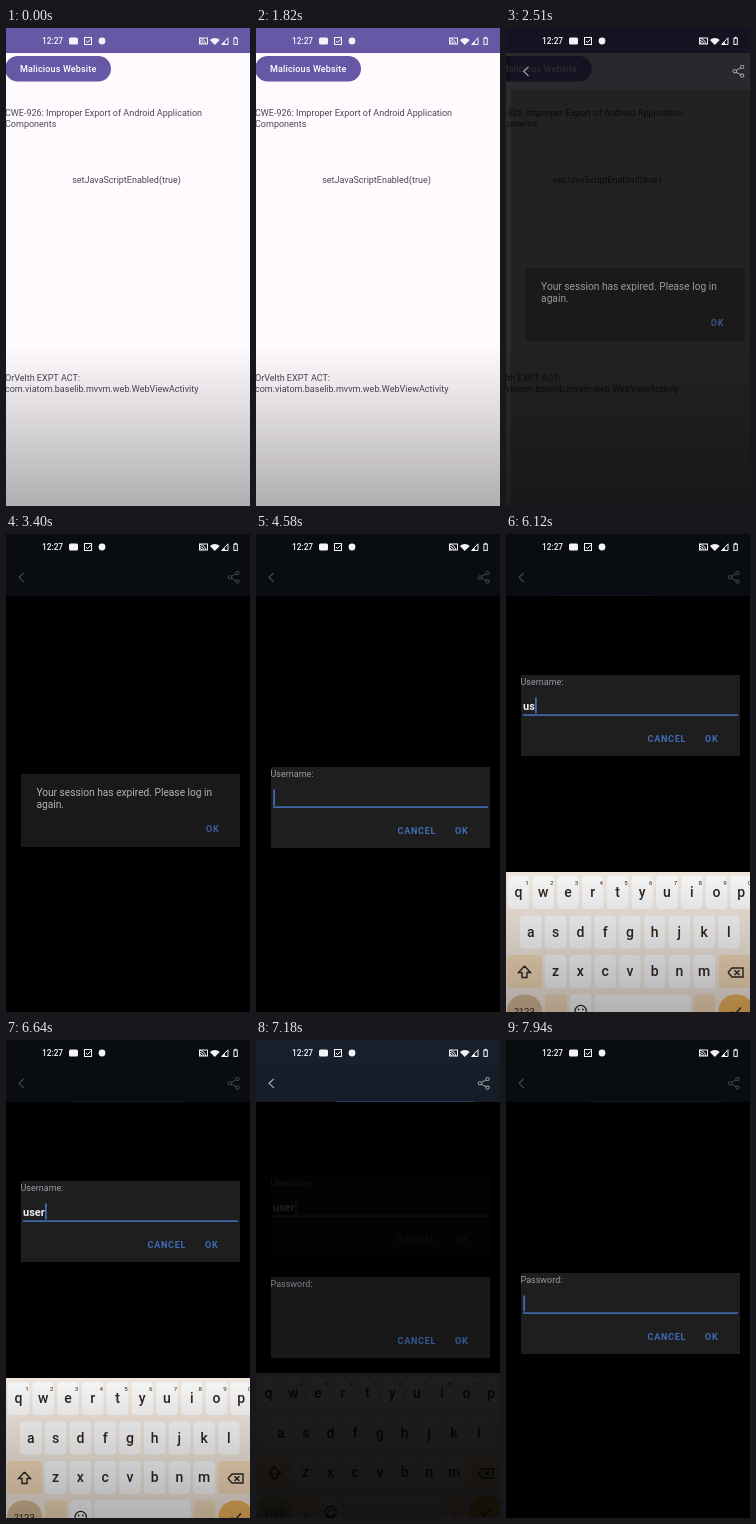
An HTML page with a canvas that plays this animation: 244 px wide and 478 px high, repeating every 8 s.

```html
<!DOCTYPE html>
<html lang="en">
<head>
<meta charset="utf-8">
<title>Exported activity demo</title>
<style>
  html, body { margin: 0; width: 100%; height: 100%; overflow: hidden; background: #000; }
  canvas { display: block; width: 244px; height: 478px; }
</style>
</head>
<body>
<canvas id="stage"></canvas>
<script>
const W = 244, H = 478, LOOP = 8000;
const ratio = window.devicePixelRatio || 1;

function surface(canvas) {
  canvas.width = W * ratio;
  canvas.height = H * ratio;
  return canvas.getContext('2d');
}

const screen2d = surface(document.getElementById('stage'));
const buffer = surface(document.createElement('canvas'));
let ctx = screen2d;

const ramp = (t, start, end) => Math.min(1, Math.max(0, (t - start) / (end - start)));
const slide = (t, start, time) => 1 - Math.pow(1 - ramp(t, start, start + time), 3);
const dip = (t, middle) => Math.max(0, 1 - Math.abs(t - middle) / 280);

// Draws a group off screen and blends it as one picture.
function layer(alpha, dx, dy, draw) {
  if (alpha <= 0) return;
  ctx = buffer;
  ctx.setTransform(ratio, 0, 0, ratio, 0, 0);
  ctx.clearRect(0, 0, W, H);
  ctx.translate(dx, dy);
  draw();
  ctx = screen2d;
  ctx.globalAlpha = alpha;
  ctx.drawImage(buffer.canvas, 0, 0, W, H);
  ctx.globalAlpha = 1;
}

function rect(x, y, w, h, color) {
  ctx.fillStyle = color;
  ctx.fillRect(x, y, w, h);
}

function round(x, y, w, h, r, color) {
  ctx.fillStyle = color;
  ctx.beginPath();
  ctx.roundRect(x, y, w, h, r);
  ctx.fill();
}

function text(str, x, y, color, { size = 9, weight = 400, align = 'left', space = 0 } = {}) {
  ctx.font = `${weight} ${size}px Roboto, sans-serif`;
  ctx.letterSpacing = space + 'px';
  ctx.textAlign = align;
  ctx.fillStyle = color;
  ctx.fillText(str, x, y);
}

function line(color, width, ...pts) {
  ctx.strokeStyle = color;
  ctx.lineWidth = width;
  ctx.beginPath();
  pts.forEach(([x, y]) => ctx.lineTo(x, y));
  ctx.stroke();
}

function disc(x, y, r, color) {
  ctx.fillStyle = color;
  ctx.beginPath();
  ctx.arc(x, y, r, 0, 7);
  ctx.fill();
}

function statusIcons() {
  const c = '#f4f4f8';
  text('12:27', 36, 16.2, c, { size: 8.3, weight: 500 });
  round(63, 9.5, 9, 7, 1.5, c);
  ctx.strokeStyle = c;
  ctx.lineWidth = 1;
  ctx.strokeRect(78.5, 9.5, 7, 7);
  line(c, 1, [80, 13], [81.6, 14.6], [84.6, 11.2]);
  disc(96, 13, 3.4, c);

  ctx.strokeRect(193.5, 10, 8, 6);
  for (const r of [1.5, 3.5, 5.5]) {
    ctx.beginPath();
    ctx.arc(194, 16, r, -Math.PI / 2, 0);
    ctx.stroke();
  }
  ctx.fillStyle = c;
  ctx.beginPath();
  ctx.moveTo(208.8, 17);
  ctx.arc(208.8, 17, 7, -2.35, -0.79);
  ctx.fill();
  line(c, 1, [222, 9.8], [222, 16.5], [215.6, 16.5], [222, 9.8]);
  line(c, 2, [217, 16], [219, 15]);
  rect(228.6, 8.8, 2, 1.4, c);
  ctx.lineWidth = 1;
  ctx.strokeRect(227.9, 10.2, 3.4, 6.2);
}

function homePage() {
  const ink = '#4b4653', purple = '#6758a6';
  rect(-30, 0, W + 60, H, '#fefafe');
  rect(-30, 0, W + 60, 25, purple);
  round(-1, 28, 106, 25.5, 12.7, purple);
  text('Malicious Website', 14, 44, '#fff', { weight: 500, space: 0.15 });
  text('CWE-926: Improper Export of Android Application', -1, 88.3, ink);
  text('Components', -1, 99.3, ink);
  text('setJavaScriptEnabled(true)', 120.5, 155, ink, { align: 'center' });
  text('OrVelth EXPT ACT:', -1, 353.3, ink);
  text('com.viatom.baselib.mvvm.web.WebViewActivity', -1, 363.8, ink);
}

function shade() {
  const g = ctx.createLinearGradient(0, 318, 0, H);
  g.addColorStop(0, 'rgba(0,0,0,0)');
  g.addColorStop(1, 'rgba(0,0,0,.3)');
  rect(0, 318, W, H - 318, g);
}

function toolbarIcons() {
  const c = '#d3d8de';
  line(c, 1.1, [17.8, 38.8], [13, 43.3], [17.8, 47.8]);
  line(c, 0.9, [232, 39], [223.5, 43.3], [232, 47.5]);
  for (const [x, y] of [[231.5, 39], [224, 43.3], [231.5, 47.6]]) {
    disc(x, y, 2.1, c);
    disc(x, y, 1.2, '#1a2531');
  }
}

const button = { weight: 700, space: 0.75 };

function sessionDialog() {
  rect(15, 240, 219, 73, '#191919');
  text('Your session has expired. Please log in', 30.4, 261.5, '#b4b4b4', { size: 10.2 });
  text('again.', 30.4, 273.7, '#b4b4b4', { size: 10.2 });
  text('OK', 200, 298, '#40609c', button);
}

function promptDialog(label, value, active) {
  const blue = '#416cb8';
  rect(15, 233, 219, 81, '#1e1e1e');
  text(label, 14.5, 243, '#969ba6');
  text(value, 17, 268, '#ececec', { size: 11, weight: 700 });
  if (active) {
    rect(17.4 + ctx.measureText(value).width, 255.5, 1.4, 16, '#4d80d8');
    rect(17, 272.3, 215, 1.6, blue);
  }
  text('CANCEL', 141.5, 300, blue, button);
  text('OK', 199, 300, blue, button);
}

// Keyboard, drawn with its top edge at y = 338.
function keyboard() {
  const ink = '#2c2827', key = '#ffffff', peach = '#f9dfbd';
  const pitch = 24.75, left = 12.5;
  const mid = { size: 14, weight: 500, align: 'center' };
  const rowY = row => 358.5 + 39.5 * row;
  const cap = (x, row, color, w = 21.5, r = 4) =>
    round(x - w / 2, rowY(row) - 16.5, w, 33, r, color);
  const icon = (...pts) => line(ink, 1.4, ...pts);

  rect(0, 338, W, 150, '#f9eee4');
  ['qwertyuiop', 'asdfghjkl', 'zxcvbnm'].forEach((letters, row) => {
    [...letters].forEach((ch, i) => {
      const x = left + pitch * (i + [0, 0.5, 1.5][row]);
      cap(x, row, key);
      text(ch, x, rowY(row) + 4.5, ink, mid);
      if (row === 0) text((i + 1) % 10, x + 8.5, 350.8, ink, { size: 6.2, align: 'center' });
    });
  });

  cap(18.5, 2, peach, 35);
  icon([18.5, 432], [12.5, 438.5], [16, 438.5], [16, 443.5],
    [21, 443.5], [21, 438.5], [24.5, 438.5], [18.5, 432]);
  cap(230, 2, peach, 35);
  icon([222, 438.5], [226, 434], [237, 434], [237, 443], [226, 443], [222, 438.5]);
  icon([228.5, 436.2], [233.5, 441]);
  icon([233.5, 436.2], [228.5, 441]);

  cap(18.5, 3, '#dcc09a', 35, 16.5);
  text('?123', 18.5, 481, ink, { size: 9.5, align: 'center' });
  cap(50, 3, peach);
  text(',', 50, 480, ink, mid);
  cap(74.7, 3, key);
  ctx.strokeStyle = ink;
  ctx.lineWidth = 1.2;
  ctx.beginPath();
  ctx.arc(74.7, 477, 5.6, 0, 7);
  ctx.moveTo(77.7, 478.5);
  ctx.arc(74.7, 478.5, 3, 0, Math.PI);
  ctx.stroke();
  disc(72.6, 475.5, 0.9, ink);
  disc(76.8, 475.5, 0.9, ink);
  cap(136.5, 3, key, 96);
  cap(198.5, 3, peach);
  text('.', 198.5, 480, ink, mid);
  cap(230, 3, '#f5b85f', 35, 16.5);
  icon([225.5, 477.5], [228.5, 480.5], [235, 473.5]);
}

function webView(t) {
  const dx = 24 * (1 - slide(t, 2230, 670));

  layer(ramp(t, 2430, 2830), 0, 0, () => {
    rect(0, 0, W, 25, '#1b2634');
    rect(dx, 25, W, 37, '#1a2531');
    rect(dx, 62, W, H, '#000');
  });
  layer(ramp(t, 2290, 2560), dx, 0, toolbarIcons);

  // The toolbar lights up while one dialog replaces another.
  const dim = ramp(t, 2520, 2850) - 0.85 * dip(t, 4120) - 0.75 * dip(t, 7180);
  layer(0.64 * dim, 0, 0, () => rect(0, 0, W, 62, '#000'));

  const load = ramp(t, 4500, 7180);
  layer(0.2 * load + 0.4 * dip(t, 7180), 0, 0,
    () => rect(80 * load, 61, 40 + 98 * load, 1, '#3a4c82'));

  layer(ramp(t, 2380, 2540) - ramp(t, 3900, 4060), dx, 0, sessionDialog);

  // The keyboard pushes the prompt up; both fade as the next prompt enters.
  const lift = slide(t, 4720, 360);
  const exit = -5 * slide(t, 6960, 220);
  const gone = ramp(t, 6900, 7220);
  const rise = start => 12 * (1 - slide(t, start, 500));
  const typed = 'user'.slice(0, Math.max(0, Math.floor((t - 5260) / 300)));

  layer(ramp(t, 4160, 4420) - gone, 0, rise(4100) - 92 * lift + exit,
    () => promptDialog('Username:', typed, true));
  if (lift > 0) layer(1 - gone, 0, 140 * (1 - lift) + exit, keyboard);
  layer(ramp(t, 7010, 7220), 0, rise(7030),
    () => promptDialog('Password:', '', t > 7400));
}

function draw(t) {
  ctx.setTransform(ratio, 0, 0, ratio, 0, 0);
  rect(0, 0, W, H, '#000');
  layer(1 - ramp(t, 2230, 2570), -24 * slide(t, 2230, 670), 0, homePage);
  if (t >= 2230) webView(t);
  shade();
  statusIcons();
}

const start = performance.now();
function tick() {
  draw((performance.now() - start) % LOOP);
  requestAnimationFrame(tick);
}
tick();
</script>
</body>
</html>
```
